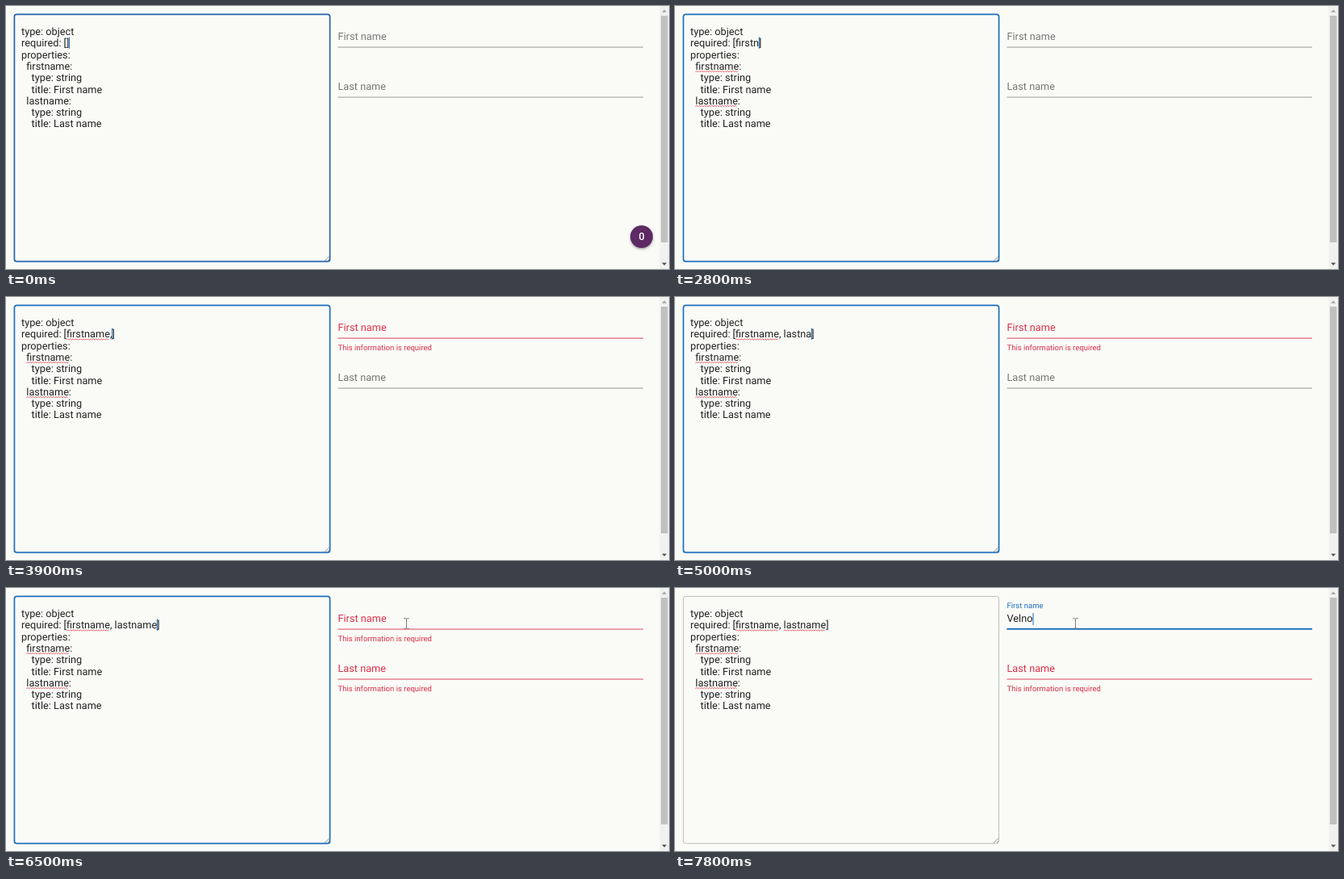
An HTML page for the animation above (8 s loop, 822 by 326 pixels).

```html
<!DOCTYPE html>
<html lang="en">
<head>
<meta charset="utf-8">
<title>Schema form</title>
<style>
  html, body { margin: 0; width: 100%; height: 100%; overflow: hidden; background: #fafbf7; }
  svg { display: block; width: 822px; height: 326px; }
  text { font: 12.72px Roboto, sans-serif; fill: #222; white-space: pre; text-rendering: geometricPrecision; }
  .message { font-size: 9.54px; }
  .wave { fill: none; stroke: #dc3c48; stroke-width: .8; }
  #fab text { font-weight: 500; fill: #fff; text-anchor: middle; }
</style>
</head>
<body>
<svg viewBox="0 0 822 326" xmlns="http://www.w3.org/2000/svg">
  <defs>
    <filter id="shadow" x="-30%" y="-30%" width="160%" height="160%">
      <feDropShadow dx="0" dy="1.4" stdDeviation="1.5" flood-opacity=".35"/>
    </filter>
  </defs>
  <rect width="822" height="326" fill="#fafbf7"/>
  <rect id="border" fill="none" rx="3"/>
  <path d="M395 316.2L401 310.2M398.4 316.2L401 313.6" stroke="#777" stroke-width=".8"/>
  <g id="editor"></g>
  <g id="form"></g>
  <rect id="caret" width="1"/>
  <g id="fab">
    <circle cx="788" cy="286" r="14" fill="#5d2c64" filter="url(#shadow)"/>
    <text x="788" y="290.4">0</text>
  </g>
  <rect x="810.5" width="11.5" height="326" fill="#f1f1f0"/>
  <rect x="812" y="12" width="8.5" height="281" fill="#c1c1c0"/>
  <path d="M813.2 7.8h6l-3-3.2z" fill="#a3a3a3"/>
  <path d="M813.2 318.2h6l-3 3.2z" fill="#505050"/>
  <path id="pointer" d="M-3.3 -6.3H-1Q0 -6.3 0 -5.3Q0 -6.3 1 -6.3H3.3M0 -5.3V5.3M-3.3 6.3H-1Q0 6.3 0 5.3Q0 6.3 1 6.3H3.3"
        fill="none" stroke="#6c6c6a" stroke-width=".9"/>
</svg>
<script>
const LOOP = 8000, TICK = 100;
const BLUE = [28, 111, 190], DEEP = [36, 99, 172], RED = [218, 49, 75];
const GREY = [119, 119, 117], LINE = [142, 142, 140], OUTLINE = [182, 183, 179];
const ERROR_1 = 3300, ERROR_2 = 5300, BLUR = 6600, FILLED = 7200;

const $ = id => document.getElementById(id);
const make = (parent, tag, attrs = {}, content = '') => {
  const node = document.createElementNS('http://www.w3.org/2000/svg', tag);
  set(node, attrs);
  node.textContent = content;
  return parent.appendChild(node);
};
function set(node, attrs) {
  for (const key in attrs) node.setAttribute(key, attrs[key]);
}
const show = (node, on) => { node.style.display = on ? '' : 'none'; };
const lerp = (a, b, p) => a + (b - a) * p;
const mix = (a, b, p) => a.map((v, i) => lerp(v, b[i], p));
const rgb = c => `rgb(${c.map(Math.round)})`;

// cubic-bezier(.25, .8, .5, 1)
function ease(x) {
  if (x <= 0) return 0;
  if (x >= 1) return 1;
  const curve = (s, a, b) => 3 * (1 - s) ** 2 * s * a + 3 * (1 - s) * s * s * b + s ** 3;
  let low = 0, high = 1;
  for (let i = 0; i < 24; i++) {
    const mid = (low + high) / 2;
    if (curve(mid, .25, .5) < x) low = mid; else high = mid;
  }
  return curve(low, .8, 1);
}
const since = (t, start, length = 300) => ease((t - start) / length);

// Value of the latest [time, value] step
const pick = (steps, t) => steps.reduce((value, step) => step[0] <= t ? step[1] : value, null);
// One more letter at each listed time
const typed = (text, times, t) => text.slice(0, times.filter(time => time <= t).length);

const LIST_TIMES = [2100, 2200, 2400, 2600, 2600, 2800, 2900, 3100, 3200, 3700,
  4000, 4200, 4400, 4600, 4700, 4900, 5000, 5200, 5300];
const NAME_TIMES = [7200, 7400, 7700, 7700, 7800];
const CARET = [[0, 'end'], [400, ''], [1200, 'list'], [1700, ''], [2100, 'list'], [5900, ''],
  [6400, 'list'], [BLUR, 'name'], [7100, ''], [FILLED, 'name']];
const POINTER = [[0, null], [1000, [250, 262]], [1100, [130, 110]], [1200, [63, 40]],
  [1300, [77.5, 41]], [1700, [97, 57]], [2100, null], [6000, [130, 72]], [6100, [270, 70]],
  [6200, [400, 58]], [6300, [470, 47]], [6400, [496.5, 44]]];

const editor = $('editor'), LEFT = 19, INDENT = 6.3;
const baseline = row => 36 + row * 14.31;
const rows = [[0, 'type: object'], [0, 'required: []'], [0, 'properties:'],
  [1, 'firstname:'], [2, 'type: string'], [2, 'title: First name'],
  [1, 'lastname:'], [2, 'type: string'], [2, 'title: Last name']]
  .map(([depth, content], i) =>
    make(editor, 'text', { x: LEFT + depth * INDENT, y: baseline(i) }, content));
const listRow = rows[1], PREFIX = 'required: [';

const width = (node, from, count) => count ? node.getSubStringLength(from, count) : 0;

function wave(x, w, row) {
  const y = baseline(row) + 2.2;
  let d = `M${x} ${y + .6}`;
  for (let i = 1; i * 1.6 <= w; i++) d += `L${x + i * 1.6} ${y + (i % 2 ? -.6 : .6)}`;
  return d;
}
const keyWaves = [[3, 9], [6, 8]].map(([row, length]) => make(editor, 'path',
  { class: 'wave', d: wave(LEFT + INDENT, width(rows[row], 0, length), row) }));
const listWaves = [[11, 9, 3700], [22, 8, BLUR]].map(([from, count, start]) =>
  ({ from, count, start, node: make(editor, 'path', { class: 'wave' }) }));

function makeField(label, top) {
  const g = make($('form'), 'g', { transform: `translate(411.5 ${top})` });
  return {
    line: make(g, 'rect', { y: 50.6, width: 378.5, height: .9 }),
    active: make(g, 'rect', { y: 49.8, height: 1.7 }),
    label: make(g, 'text', {}, label),
    value: make(g, 'text', { y: 42.4 }),
    message: make(g, 'text', { class: 'message', fill: rgb(RED) }, 'This information is required')
  };
}
const first = makeField('First name', 0), last = makeField('Last name', 62);

function drawField(field, error, focus, valid, shown) {
  const paint = base => rgb(mix(mix(base, RED, error), BLUE, valid));
  field.line.style.fill = paint(LINE);
  field.label.style.fill = paint(GREY);
  field.active.style.fill = paint(BLUE);
  set(field.active, { x: 189.25 * (1 - focus), width: 378.5 * focus });
  set(field.label, {
    transform: `translate(0 ${lerp(42.4, 24.8, focus)}) scale(${lerp(1, .75, focus)})`
  });
  set(field.message, { y: 66 - 4 * (1 - shown), opacity: shown });
  field.message.style.fill = rgb(RED);
}

function draw(t) {
  const blur = since(t, BLUR, 150);
  const focused = mix(DEEP, BLUE, Math.min(1, t / 500));
  set($('border'), {
    x: 10.4, y: 10.4, width: 391.2, height: 306.3,
    stroke: rgb(mix(focused, OUTLINE, blur)), 'stroke-width': lerp(1.7, .9, blur)
  });

  const list = typed('firstname, lastname', LIST_TIMES, t);
  listRow.textContent = PREFIX + list + ']';
  keyWaves.forEach(node => show(node, t >= 800));
  for (const { from, count, start, node } of listWaves) {
    show(node, t >= start);
    if (t >= start) set(node, { d: wave(LEFT + width(listRow, 0, from), width(listRow, from, count), 1) });
  }

  const name = typed('Velno', NAME_TIMES, t);
  first.value.textContent = name;
  const error = since(t, ERROR_1), valid = since(t, FILLED), lastError = since(t, ERROR_2);
  drawField(first, error, since(t, BLUR), valid, error * (1 - valid));
  drawField(last, lastError, 0, 0, lastError);

  const place = pick(CARET, t), caret = $('caret');
  show(caret, place);
  if (place === 'name') {
    set(caret, { x: 411.6 + width(first.value, 0, name.length), y: 31, height: 15 });
    caret.style.fill = rgb(mix(RED, BLUE, valid));
  } else if (place) {
    const count = PREFIX.length + list.length + (place === 'end' ? 1 : 0);
    set(caret, { x: LEFT + width(listRow, 0, count) - .3, y: 38.5, height: 14.3 });
    caret.style.fill = rgb(BLUE);
  }

  const spot = pick(POINTER, t);
  show($('pointer'), spot);
  if (spot) set($('pointer'), { transform: `translate(${spot})` });
  show($('fab'), t < 1700);
}

const origin = performance.now();
function frame() {
  const t = (performance.now() - origin) % LOOP;
  draw(Math.floor(t / TICK) * TICK);
  requestAnimationFrame(frame);
}
frame();
</script>
</body>
</html>
```
